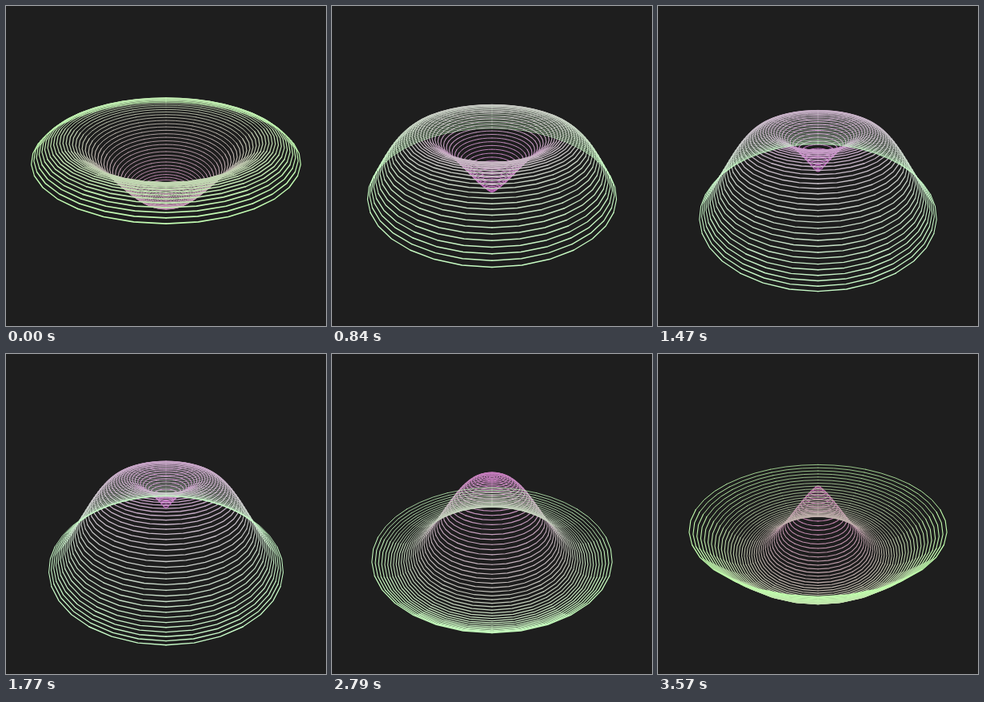
Recreate the animation shown at these times as an HTML page without scripts. Size 400 px wide and 400 px high, loop 3600 ms.

```html
<!DOCTYPE html>
<html lang="en">
<head>
<meta charset="utf-8">
<title>Ring wave</title>
<style>
  @property --phase {
    syntax: "<angle>";
    inherits: true;
    initial-value: 248deg;
  }

  html, body { margin: 0; width: 100%; height: 100%; overflow: hidden; background: #1e1e1e; }
  svg { display: block; width: 400px; height: 400px; }

  .wave {
    --focal: 346.41;
    --red: calc(150 + 50 * sin(var(--phase) / 4));
    --blue: calc(150 - 50 * cos(var(--phase) / 2));
    fill: none;
    stroke-linecap: round;
    stroke-linejoin: round;
    animation: swell 3.6s infinite;
  }

  /* A circle at height z, tilted by 60deg and seen in perspective, is an ellipse. */
  .wave use {
    --r: calc(var(--i) * 3);
    --z: calc(50 * sin(var(--phase) + var(--i) * 5deg));
    --depth: calc(var(--focal) - var(--z) / 2);
    --q: calc(var(--depth) * var(--depth) - .75 * var(--r) * var(--r));
    --cy: calc(var(--focal) * (.433 * var(--r) * var(--r) - .866 * var(--z) * var(--depth)) / var(--q));
    --rx: calc(var(--focal) * var(--r) / sqrt(var(--q)));
    --ry: calc(var(--focal) * var(--r) * (var(--focal) / 2 - var(--z)) / var(--q));
    transform: translate(200px, calc(200px + var(--cy) * 1px)) scale(var(--rx), var(--ry));
    stroke: rgb(var(--red), calc(100 + 3.1 * var(--i)), var(--blue));
  }

  /* Nearer arcs are drawn thicker; --near runs from 1 in front to -1 at the back. */
  path {
    vector-effect: non-scaling-stroke;
    stroke-width: calc(1px * var(--focal) / (var(--depth) - .866 * var(--near) * var(--r)));
  }

  /* The loop restarts with a jump, then advances evenly. */
  @keyframes swell {
    0% { --phase: 248deg; animation-timing-function: step-end; }
    .8333% { --phase: 252deg; animation-timing-function: steps(119); }
    100% { --phase: 490deg; }
  }
</style>
</head>
<body>
<svg viewBox="0 0 400 400">
  <defs>
    <g id="half">
      <path style="--near:.966" d="M0 1L.24 .971 .463 .886 .655 .755"/>
      <path style="--near:.707" d="M.655 .755L.807 .591 .914 .407 .977 .215"/>
      <path style="--near:.259" d="M.977 .215L1 .025 .988 -.155 .948 -.32"/>
      <path style="--near:-.259" d="M.948 -.32L.884 -.468 .803 -.597 .708 -.707"/>
      <path style="--near:-.707" d="M.708 -.707L.602 -.798 .489 -.872 .371 -.929"/>
      <path style="--near:-.966" d="M.371 -.929L.249 -.969 .125 -.992 0 -1"/>
    </g>
    <g id="ring">
      <use href="#half"/>
      <use href="#half" transform="scale(-1 1)"/>
    </g>
  </defs>
  <g class="wave">
    <use href="#ring" style="--i:1"/>
    <use href="#ring" style="--i:2"/>
    <use href="#ring" style="--i:3"/>
    <use href="#ring" style="--i:4"/>
    <use href="#ring" style="--i:5"/>
    <use href="#ring" style="--i:6"/>
    <use href="#ring" style="--i:7"/>
    <use href="#ring" style="--i:8"/>
    <use href="#ring" style="--i:9"/>
    <use href="#ring" style="--i:10"/>
    <use href="#ring" style="--i:11"/>
    <use href="#ring" style="--i:12"/>
    <use href="#ring" style="--i:13"/>
    <use href="#ring" style="--i:14"/>
    <use href="#ring" style="--i:15"/>
    <use href="#ring" style="--i:16"/>
    <use href="#ring" style="--i:17"/>
    <use href="#ring" style="--i:18"/>
    <use href="#ring" style="--i:19"/>
    <use href="#ring" style="--i:20"/>
    <use href="#ring" style="--i:21"/>
    <use href="#ring" style="--i:22"/>
    <use href="#ring" style="--i:23"/>
    <use href="#ring" style="--i:24"/>
    <use href="#ring" style="--i:25"/>
    <use href="#ring" style="--i:26"/>
    <use href="#ring" style="--i:27"/>
    <use href="#ring" style="--i:28"/>
    <use href="#ring" style="--i:29"/>
    <use href="#ring" style="--i:30"/>
    <use href="#ring" style="--i:31"/>
    <use href="#ring" style="--i:32"/>
    <use href="#ring" style="--i:33"/>
    <use href="#ring" style="--i:34"/>
    <use href="#ring" style="--i:35"/>
    <use href="#ring" style="--i:36"/>
    <use href="#ring" style="--i:37"/>
    <use href="#ring" style="--i:38"/>
    <use href="#ring" style="--i:39"/>
    <use href="#ring" style="--i:40"/>
    <use href="#ring" style="--i:41"/>
    <use href="#ring" style="--i:42"/>
    <use href="#ring" style="--i:43"/>
    <use href="#ring" style="--i:44"/>
    <use href="#ring" style="--i:45"/>
    <use href="#ring" style="--i:46"/>
    <use href="#ring" style="--i:47"/>
    <use href="#ring" style="--i:48"/>
    <use href="#ring" style="--i:49"/>
  </g>
</svg>
</body>
</html>
```
